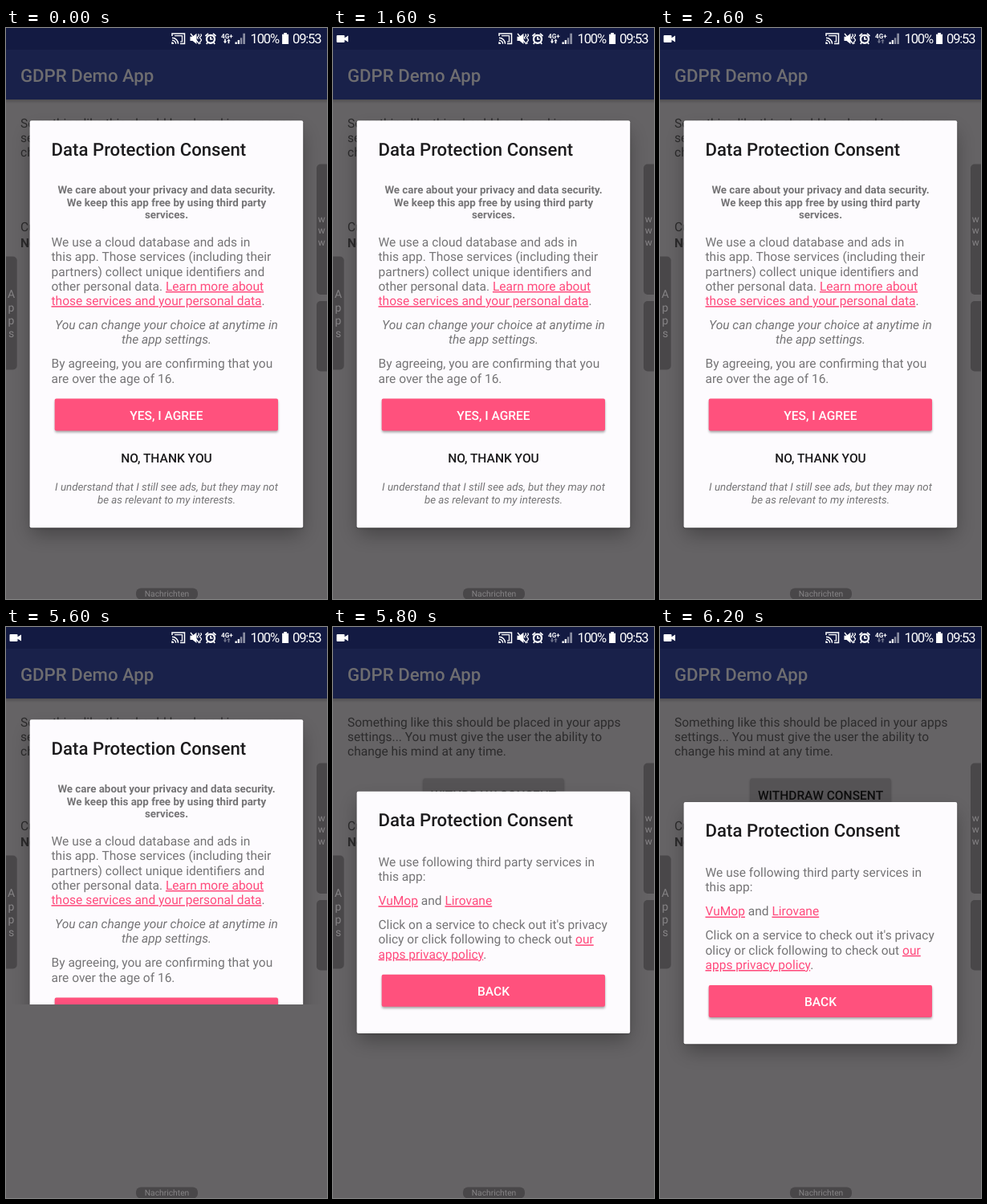
Write an HTML page that moves like this. It is 400x711 px and loops after 8000 ms.

```html
<!DOCTYPE html>
<html lang="en">
<head>
<meta charset="utf-8">
<title>Consent dialog</title>
<style>
html, body { margin: 0; width: 100%; height: 100%; overflow: hidden; background: #656365; }
svg { display: block; width: 100%; height: 100%; overflow: hidden; }
text { font: 15.56px Roboto, Arial, sans-serif; text-rendering: geometricPrecision; white-space: pre; }
.title { font-size: 22.2px; font-weight: 500; fill: #1c1b1d; }
.body { fill: #757476; }
.mid { text-anchor: middle; }
.small { font-size: 13.33px; }
.bold { font-weight: 700; }
.it { font-style: italic; }
.btn { font-weight: 500; text-anchor: middle; }
.link { fill: #ff4a7c; text-decoration: underline; }
.page { fill: #2c2b2c; }
.tab { fill: #494749; }
.tabtext { fill: #858385; font-size: 14px; text-anchor: middle; }
.clock { font-size: 16.6px; letter-spacing: -1.2px; fill: #fff; }

/* one 8 s loop, hard cuts */
#cam, #arrows, #consent, #services, #window { animation: 8s step-end infinite; }
#cam { animation-name: cam; }
#arrows { animation-name: arrows; }
#consent { animation-name: consent; }
#services { animation-name: services; }
#window { animation-name: window; }
@keyframes cam { 0% { opacity: 0 } 1.25%, 100% { opacity: 1 } }
@keyframes arrows { 0% { opacity: 1 } 1.25% { opacity: .4 } 20% { opacity: 1 } 31.25%, 100% { opacity: .4 } }
@keyframes consent { 0% { visibility: visible } 71.25%, 100% { visibility: hidden } }
@keyframes window { 0% { transform: none } 70%, 100% { transform: translateY(-241px) } }
@keyframes services {
  0% { visibility: hidden; transform: translateY(115px) }
  71.25% { visibility: visible; transform: translateY(151.3px) }
  72.5% { visibility: visible; transform: translateY(204.7px) }
  73.75% { visibility: visible; transform: translateY(215px) }
  75% { visibility: visible; transform: translateY(217.5px) }
  76.25%, 100% { visibility: visible; transform: translateY(218.1px) }
}
</style>
</head>
<body>
<svg viewBox="0 0 400 711">
  <defs>
    <filter id="soft" x="-30%" y="-30%" width="160%" height="160%"><feGaussianBlur stdDeviation="12"/></filter>
    <filter id="near" x="-10%" y="-50%" width="120%" height="200%"><feGaussianBlur stdDeviation="1.5"/></filter>
    <linearGradient id="drop" x2="0" y2="1"><stop stop-opacity=".2"/><stop offset="1" stop-opacity="0"/></linearGradient>
    <clipPath id="frame"><rect id="window" width="400" height="711"/></clipPath>
  </defs>
  <rect width="400" height="711" fill="#656365"/>
  <rect y="89" width="400" height="5" fill="url(#drop)"/>
  <rect y="27" width="400" height="62" fill="#19214a"/>
  <rect width="400" height="27" fill="#131a42"/>
  <text class="title" x="18" y="66.5" style="fill:#6e6d70">GDPR Demo App</text>
  <text class="page" x="18" y="123.5">Something like this should be placed in your apps</text>
  <text class="page" x="18" y="142">settings... You must give the user the ability to</text>
  <text class="page" x="18" y="160.2">change his mind at any time.</text>
  <rect x="112.5" y="190" width="175" height="40" rx="2" opacity=".3" filter="url(#near)"/>
  <rect x="112.5" y="188.5" width="175" height="40" rx="2" fill="#555355"/>
  <text class="btn" x="200" y="215" fill="#0d0d0d">WITHDRAW CONSENT</text>
  <text class="page" x="18" y="252.5">Current consent:</text>
  <text class="page bold" x="18" y="273">No consent</text>

  <g id="consent" clip-path="url(#frame)">
    <rect x="32" y="130" width="336" height="500" opacity=".32" filter="url(#soft)"/>
    <rect x="30" y="117" width="340" height="506" rx="2" opacity=".3" filter="url(#near)"/>
    <rect x="29.6" y="115.3" width="340.6" height="506.9" rx="2" fill="#fdfbfe"/>
    <text class="title" x="56.5" y="159.3">Data Protection Consent</text>
    <g class="body">
      <text class="small bold mid" x="200" y="206">We care about your privacy and data security.</text>
      <text class="small bold mid" x="200" y="221.7">We keep this app free by using third party</text>
      <text class="small bold mid" x="200" y="237.3">services.</text>
      <text x="56.5" y="272.2">We use a cloud database and ads in</text>
      <text x="56.5" y="290.4">this app. Those services (including their</text>
      <text x="56.5" y="308.6">partners) collect unique identifiers and</text>
      <text x="56.5" y="326.9">other personal data. <tspan class="link">Learn more about</tspan></text>
      <text x="56.5" y="345.1"><tspan class="link">those services and your personal data</tspan>.</text>
      <text class="it mid" x="200" y="375">You can change your choice at anytime in</text>
      <text class="it mid" x="200" y="393.3">the app settings.</text>
      <text x="56.5" y="423.3">By agreeing, you are confirming that you</text>
      <text x="56.5" y="441.6">are over the age of 16.</text>
      <text class="small it mid" x="200" y="576">I understand that I still see ads, but they may not</text>
      <text class="small it mid" x="200" y="591.6">be as relevant to my interests.</text>
    </g>
    <rect x="61" y="463.5" width="278" height="40" rx="2" opacity=".35" filter="url(#near)"/>
    <rect x="60.7" y="461.6" width="278.3" height="40" rx="2" fill="#ff517d"/>
    <text class="btn" x="200" y="487.6" fill="#fff">YES, I AGREE</text>
    <text class="btn" x="200" y="541.2" fill="#1c1b1d">NO, THANK YOU</text>
  </g>

  <g id="services">
    <rect x="32" y="14" width="336" height="295" opacity=".32" filter="url(#soft)"/>
    <rect x="30" y="1.5" width="340" height="300" rx="2" opacity=".3" filter="url(#near)"/>
    <rect x="29.6" width="340.6" height="301.2" rx="2" fill="#fdfbfe"/>
    <text class="title" x="56.5" y="43.4">Data Protection Consent</text>
    <g class="body">
      <text x="56.5" y="93.200">We use following third party services in</text>
      <text x="56.5" y="111.400">this app:</text>
      <text x="56.5" y="141.400"><tspan class="link">VuMop</tspan> and <tspan class="link">Lirovane</tspan></text>
      <text x="56.5" y="171.400">Click on a service to check out it's privacy</text>
      <text x="56.5" y="189.700">olicy or click following to check out <tspan class="link">our</tspan></text>
      <text x="56.5" y="207.900"><tspan class="link">apps privacy policy</tspan>.</text>
    </g>
    <rect x="61" y="230" width="278" height="40" rx="2" opacity=".35" filter="url(#near)"/>
    <rect x="60.7" y="228" width="278.3" height="40" rx="2" fill="#ff517d"/>
    <text class="btn" x="200" y="254" fill="#fff">BACK</text>
  </g>

  <!-- edge tabs -->
  <rect class="tab" x="-8" y="284.5" width="21.7" height="141" rx="5"/>
  <rect class="tab" x="387" y="169.5" width="22" height="162.5" rx="5"/>
  <rect class="tab" x="387" y="340" width="22" height="87.5" rx="5"/>
  <rect class="tab" x="162" y="697.5" width="77" height="14" rx="6"/>
  <text class="tabtext" x="6.5" y="336.3">A</text>
  <text class="tabtext" x="6.5" y="352.6">p</text>
  <text class="tabtext" x="6.5" y="368.9">p</text>
  <text class="tabtext" x="6.5" y="385.2">s</text>
  <text class="tabtext" x="393.3" y="241.5" style="font-size:12px">w</text>
  <text class="tabtext" x="393.3" y="256" style="font-size:12px">w</text>
  <text class="tabtext" x="393.3" y="270.5" style="font-size:12px">w</text>
  <text class="tabtext" x="200.5" y="708.3" style="font-size:10.3px">Nachrichten</text>

  <!-- status bar -->
  <path id="cam" fill="#fff" d="M5.5 9h8q1 0 1 1v2.2l4.5-2.7v8l-4.5-2.7v2.2q0 1-1 1h-8q-1 0-1-1v-7q0-1 1-1z"/>
  <g fill="none" stroke="#fff" stroke-width="1.5">
    <path d="M207 10V7h15.5v12.5h-5.5M207 12.2a7.6 7.6 0 0 1 7.6 7.6M207 15.2a4.6 4.6 0 0 1 4.6 4.6"/>
    <path d="M210 9.700h9.5v7.3h-2.5" stroke-width="1.2"/>
    <path d="M230 7l11 13M239.500 7.500q2 1.500 0 3t0 3M242.500 7.500q2 1.500 0 3t0 3t0 3t0 3" stroke-width="1.3"/>
    <circle cx="255" cy="13.8" r="5" stroke-width="2.3"/>
    <path d="M255 10.8v3.2h2.6M248.5 10l3.5-3.2M261.5 10l-3.5-3.2M251.3 18l-1.5 2M258.7 18l1.5 2" stroke-width="1.7"/>
  </g>
  <g fill="#fff">
    <path d="M206.3 17.2a2.8 2.8 0 0 1 2.8 2.8h-2.8z"/>
    <path d="M229.5 10.8h3l5-4v13.2l-5-4h-3z"/>
    <text x="268" y="12.6" style="font-size:8.2px;font-weight:700">4G+</text>
    <path id="arrows" d="M272.2 13.5h1.6v3h1.4l-2.2 2.8-2.2-2.8h1.4zM276.7 19.3h1.6v-3h1.4l-2.2-2.8-2.2 2.8h1.4z"/>
    <path d="M285.5 17.5h2.3v2.5h-2.3zM288.7 15h2.3v5h-2.3z"/>
    <path d="M291.9 12.3h2.3V20h-2.3zM295.3 6.8h2.7V20h-2.7z" opacity=".5"/>
    <path d="M346.3 6h3.6v1.7h2.2V20h-8V7.7h2.2z"/>
  </g>
  <text class="clock" x="304.5" y="19.4">100%</text>
  <text class="clock" x="357" y="19.4">09:53</text>
</svg>
</body>
</html>
```
